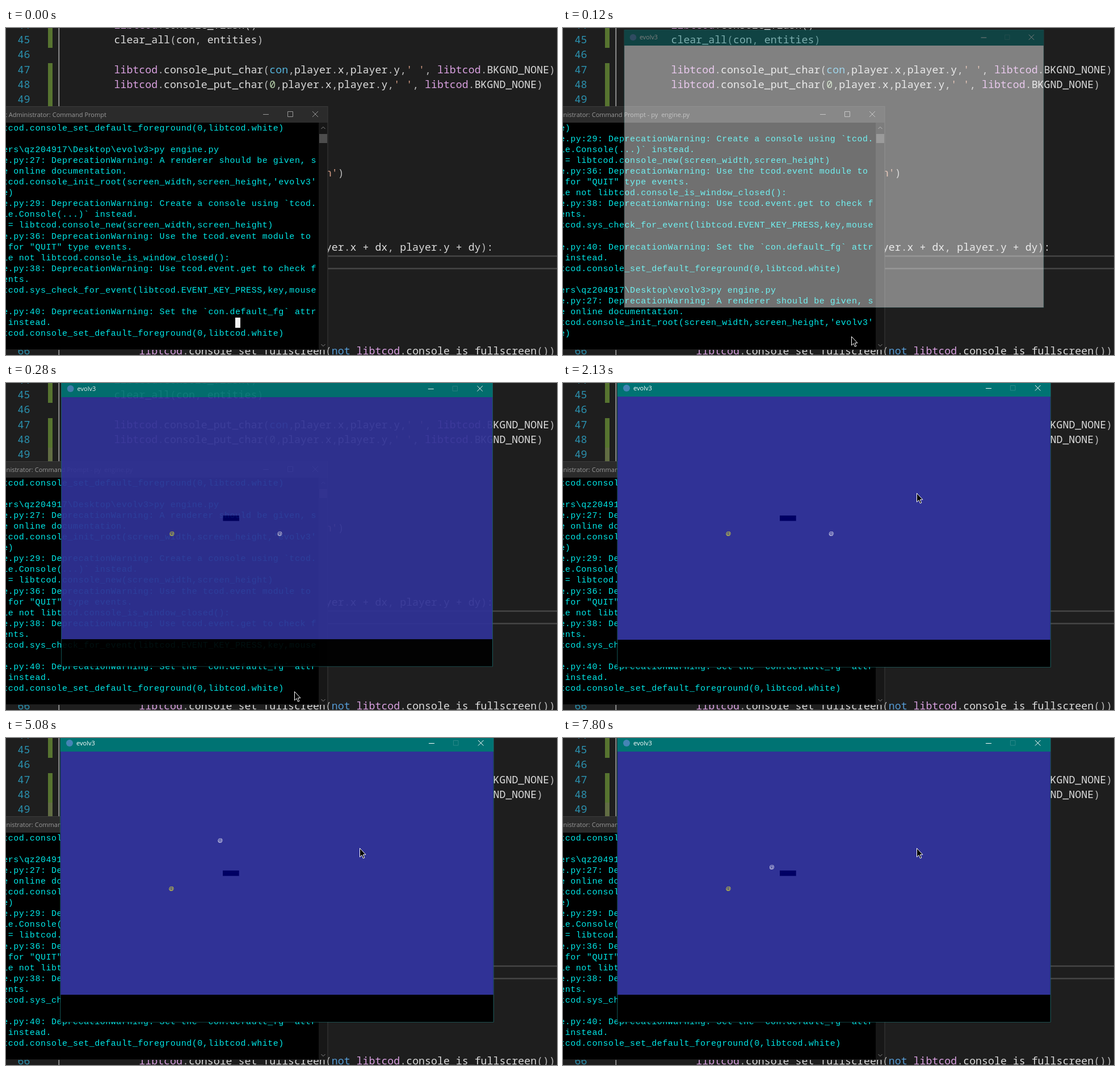
These frames come from a looping animation (971 px wide and 577 px high, 8000 ms). An HTML page:

```html
<!DOCTYPE html>
<html lang="en">
<head>
<meta charset="utf-8">
<title>evolv3</title>
<style>
  html, body { margin: 0; width: 100%; height: 100%; overflow: hidden; background: #1e1e1e; }
  svg { display: block; }
  text { white-space: pre; }
  .code { font: 18.25px "Noto Sans Mono", monospace; fill: #dcdcdc; }
  .num { fill: #2b91af; }
  .term { font: 15px "Liberation Mono", monospace; letter-spacing: .53px; fill: #00e8e8; }
  .ui { font: 11.05px "Open Sans", sans-serif; }
  .glyph { font: 9.3px "Liberation Sans", sans-serif; text-anchor: middle; }
  .icon { fill: none; stroke-width: 1; }
</style>
</head>
<body>
<svg width="971" height="577" viewBox="0 0 971 577">
  <rect width="971" height="577" fill="#1e1e1e"/>
  <g fill="#577430">
    <rect x="74" y="0" width="8" height="35"/>
    <rect x="74" y="62" width="8" height="76"/>
  </g>
  <rect id="barShade" x="74" y="114" width="8" height="24" fill="#666b4c" opacity=".7"/>
  <rect x="92.5" width="1.6" height="577" fill="#a5a5a5"/>
  <path d="M560 402.5H971M560 424.5H971" stroke="#464646" stroke-width="2.6"/>
  <g id="code"></g>

  <g id="console">
    <rect x="-5" y="138" width="572.5" height="430" fill="#3a3a3a"/>
    <rect x="-5" y="139" width="571.5" height="28" fill="#2b2b2b"/>
    <rect x="-5" y="167" width="556" height="400.5" fill="#000"/>
    <rect x="551" y="167" width="15.5" height="400.5" fill="#171717"/>
    <rect x="552" y="187" width="14" height="16" fill="#4d4d4d"/>
    <path class="icon" stroke="#8a8a8a" d="M555.5 178l3.5-3.5 3.5 3.5M555.5 558l3.5 3.5 3.5-3.5"/>
    <path class="icon" stroke="#999" d="M453 152.5h10M496.5 147.5h9v9h-9zM540 147l10 10m0-10l-10 10"/>
    <text id="caption" class="ui" y="156.5" text-anchor="end" fill="#999"></text>
    <g id="rows"></g>
    <rect id="block" x="404" y="511" width="9" height="18" fill="#f2f2f2"/>
  </g>

  <g id="game">
    <rect x="95.5" y="-5" width="764" height="506.5" fill="#1c7c7c"/>
    <rect x="96.2" y="-4" width="762.6" height="28" fill="#007373"/>
    <circle cx="112" cy="9" r="6" fill="#4584b6"/>
    <text class="ui" x="124" y="13" fill="#fff">evolv3</text>
    <path class="icon" stroke="#fff" d="M745 9.5h10M832 4l9.5 9.5m0-9.5l-9.5 9.5"/>
    <path class="icon" stroke="#2b8888" d="M788.5 4.5h8.5v8.5h-8.5z"/>
    <rect id="client" x="96.2" y="24" width="762.6" height="477"/>
    <g id="map">
      <rect x="96.2" y="24" width="762.6" height="429" fill="#303296"/>
      <rect x="382" y="233.8" width="28.7" height="9.6" fill="#000064"/>
      <text id="npc" class="glyph" fill="#ffff20">@</text>
      <text id="player" class="glyph" fill="#fff">@</text>
    </g>
  </g>
  <path id="mouse" d="M.5 .5V16L4 12.7 6.4 18.3 8.8 17.3 6.4 11.8H11Z" fill="#000" stroke="#fff"/>
</svg>
<script>
const LOOP = 8000, CELL = 9.54;
const $ = id => document.getElementById(id);

function addText(parent, cls, x, y, html) {
  const el = document.createElementNS('http://www.w3.org/2000/svg', 'text');
  el.setAttribute('class', cls);
  el.setAttribute('x', x);
  el.setAttribute('y', y);
  el.innerHTML = html;
  return parent.appendChild(el);
}

// Editor
const tint = { l: '#d8a0df', n: '#569cd6', c: '#55b4dc', "'": '#d69d85', 0: '#b5cea8' };
const highlight = s => s.replace(/libtcod|'[^']*'|\bnot\b|\bcon(?=,p)|\b0\b|[().,]/g,
  m => `<tspan fill="${tint[m[0]] || '#b8b8b8'}">${m}</tspan>`);
const lineY = n => 79.5 + (n - 47) * 26.13;
const code = [
  [44, 0, 'libtcod.console_flush()'],
  [45, 0, 'clear_all(con, entities)'],
  [47, 0, "libtcod.console_put_char(con,player.x,player.y,' ', libtcod.BKGND_NONE)"],
  [48, 0, "libtcod.console_put_char(0,player.x,player.y,' ', libtcod.BKGND_NONE)"],
  [54, 33, "'n')"],
  [59, 34, 'yer.x + dx, player.y + dy):'],
  [66, 4, 'libtcod.console_set_fullscreen(not libtcod.console_is_fullscreen())']
];
for (const [n, col, s] of code) addText($('code'), 'code', 190.5 + col * 10.95, lineY(n), highlight(s));
for (const n of [44, 45, 46, 47, 48, 49, 66]) addText($('code'), 'code num', 20.5, lineY(n), n);

// Terminal: the same output repeats on every run
const warn = (n, s) => `e.py:${n}: DeprecationWarning: ${s}`;
const output = [
  'tcod.console_set_default_foreground(0,libtcod.white)',
  '',
  'ers\\qz204917\\Desktop\\evolv3>py engine.py',
  warn(27, 'A renderer should be given, s'),
  'e online documentation.',
  "tcod.console_init_root(screen_width,screen_height,'evolv3'",
  'e)',
  warn(29, 'Create a console using `tcod.'),
  'le.Console(...)` instead.',
  ' = libtcod.console_new(screen_width,screen_height)',
  warn(36, 'Use the tcod.event module to'),
  ' for "QUIT" type events.',
  'le not libtcod.console_is_window_closed():',
  warn(38, 'Use tcod.event.get to check f'),
  'ents.',
  'tcod.sys_check_for_event(libtcod.EVENT_KEY_PRESS,key,mouse',
  '',
  warn(40, 'Set the `con.default_fg` attr'),
  ' instead.'
];
const rows = Array.from({ length: 20 }, (_, i) => addText($('rows'), 'term', -5.8, 181 + i * 19.05, ''));

// Opening phases: start, scroll, window scale, opacity, client colour
const phases = [
  [0, 0, 1, 0, '#fff'],
  [70, 6, 1, 0, '#fff'],
  [120, 6, .9686, .44, '#fff'],
  [200, 16, .989, .79, '#000'],
  [280, 19, .9955, .93, '#000'],
  [350, 19, 1, 1, '#000']
];

// Player walk: first time, last time, steps, target column and row
const walk = [
  [2130, 2130, 1, 39, 25], [2280, 2280, 1, 38, 25],
  [2830, 3222, 6, 25, 25], [3300, 3300, 1, 25, 24],
  [3760, 4010, 4, 25, 16], [4150, 4150, 1, 26, 16],
  [4620, 4620, 1, 27, 16], [4930, 4930, 1, 28, 16],
  [5080, 5080, 1, 29, 16], [5310, 5390, 2, 31, 16],
  [5630, 5630, 1, 31, 17], [6090, 6240, 3, 31, 21],
  [6950, 6950, 1, 30, 21], [7560, 7560, 1, 29, 21],
  [7800, 7800, 1, 28, 21]
];

// Share of a stepped move that is done at time t
function progress(t, from, to, steps) {
  if (t < from) return 0;
  if (t >= to) return 1;
  return (Math.floor((t - from) / (to - from) * (steps - 1)) + 1) / steps;
}

function playerAt(t) {
  let col = 40, row = 25;
  for (const [from, to, steps, c, r] of walk) {
    const p = progress(t, from, to, steps);
    col += Math.round((c - col) * p);
    row += Math.round((r - row) * p);
  }
  return [col, row];
}

function mouseAt(t) {
  if (t >= 1510) return [623, 194];
  const p = progress(t, 660, 1120, 7), e = p * p * (3 - 2 * p);
  return [508 + 111 * e, 544 - 350 * e];
}

function place(el, col, row) {
  el.setAttribute('x', 96 + (col + .5) * CELL);
  el.setAttribute('y', 24 + (row + .5) * CELL + 2.2);
}

const show = (el, on) => el.setAttribute('visibility', on ? 'visible' : 'hidden');
let shown = null;

function setPhase(phase) {
  if (phase === shown) return;
  shown = phase;
  const [start, scroll, scale, alpha, fill] = phase;
  const running = start > 0;
  rows.forEach((el, i) => el.textContent = output[(i + scroll) % output.length]);
  $('caption').textContent = running
    ? 'Administrator: Command Prompt - py\u00a0 engine.py'
    : 'Select Administrator: Command Prompt';
  $('caption').setAttribute('x', running ? 223 : 177);
  show($('block'), !running);
  show($('mouse'), running);
  show($('barShade'), start >= 200);
  show($('map'), start >= 280);
  $('client').setAttribute('fill', fill);
  $('game').setAttribute('opacity', alpha);
  $('game').setAttribute('transform',
    `translate(477.4 248) scale(${scale}) translate(-477.4 -248)`);
}

function draw() {
  const t = performance.now() % LOOP;
  setPhase(phases.findLast(p => t >= p[0]));
  place($('player'), ...playerAt(t));
  $('mouse').setAttribute('transform', `translate(${mouseAt(t)})`);
  requestAnimationFrame(draw);
}

place($('npc'), 20, 25);
draw();
</script>
</body>
</html>
```
